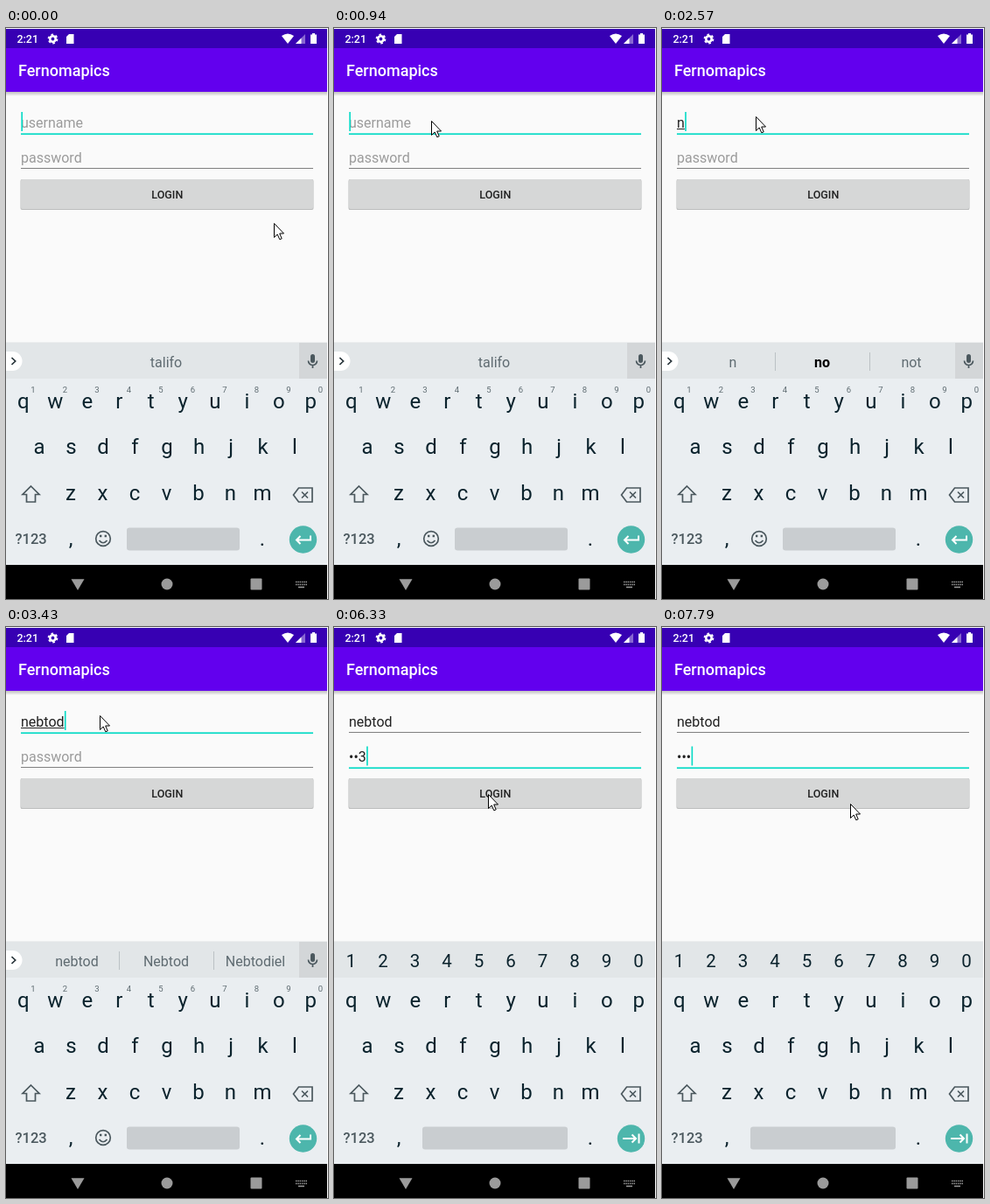
An HTML page for the animation above (8000 ms loop, 368 px wide and 653 px high).

```html
<!DOCTYPE html>
<html lang="en">
<head>
<meta charset="utf-8">
<title>Login screen</title>
<style>
html, body { margin: 0; width: 100%; height: 100%; overflow: hidden; background: #fff; }
svg { display: block; width: 368px; height: 653px; font-family: Roboto, sans-serif; }
.mid { text-anchor: middle; }
.key { font-size: 24px; fill: #0b232d; }
.num { font-size: 20.5px; fill: #0b232d; }
.sup { font-size: 9.5px; fill: #5d6a70; }
.sug { font-size: 16px; fill: #5f6b71; }
.hint { font-size: 16px; fill: #9b9b9b; }
.field { font-size: 16px; fill: #212121; }
.icon { fill: none; stroke: #4b585e; stroke-width: 1.7; }
</style>
</head>
<body>
<svg viewBox="0 0 368 653">
  <defs>
    <linearGradient id="shade" x2="0" y2="1">
      <stop stop-color="#000" stop-opacity=".24"/><stop offset="1" stop-color="#000" stop-opacity="0"/>
    </linearGradient>
    <clipPath id="buttonClip"><rect x="17" y="173" width="334" height="34" rx="2"/></clipPath>
  </defs>
  <rect width="367" height="653" fill="#fafafa"/>

  <!-- status and app bar -->
  <rect y="1" width="367" height="22" fill="#3700b3"/>
  <rect y="23" width="367" height="50" fill="#6200ee"/>
  <rect y="73" width="367" height="5" fill="url(#shade)"/>
  <g fill="#fff">
    <text x="12.400" y="17" font-size="12.500" font-weight="500">2:21</text>
    <circle cx="53.500" cy="12.500" r="3.200" fill="none" stroke="#fff" stroke-width="2.600"/>
    <circle cx="53.500" cy="12.500" r="5" fill="none" stroke="#fff" stroke-width="1.800" stroke-dasharray="2.6 2.636"/>
    <path d="M72 7H77.500V18H69V10Z"/>
    <path d="M315 9Q322 4 329 9L322 18Z"/>
    <path d="M342 7V18H331Z" opacity=".4"/>
    <path d="M337.500 11.500V18H331Z"/>
    <path d="M350 6H353V7.500H355V18H348V7.500H350Z"/>
    <text x="14" y="55" font-size="18" font-weight="500">Fernomapics</text>
  </g>

  <!-- form -->
  <text id="userHint" class="hint" x="17" y="114">username</text>
  <text id="passHint" class="hint" x="17" y="154">password</text>
  <text id="user" class="field" x="17" y="114"></text>
  <text id="pass" class="field" x="17" y="154"></text>
  <rect id="compose" x="17" y="115" height="1" fill="#212121"/>
  <rect id="userLine" x="17" width="334"/>
  <rect id="passLine" x="17" width="334"/>
  <rect id="caret" width="1.600" height="22" fill="#03dac5"/>
  <rect id="lift" x="17" y="175" width="334" height="35" rx="3" fill="#000"/>
  <rect x="16.500" y="173" width="335" height="35" rx="2" fill="#bcbdbd"/>
  <rect x="17" y="173" width="334" height="34" rx="2" fill="#d6d7d7"/>
  <circle id="ripple" cx="216" cy="203" clip-path="url(#buttonClip)"/>
  <text class="mid" x="184.300" y="195" font-size="12.500" font-weight="500" fill="#212121">LOGIN</text>

  <!-- keyboard -->
  <rect y="359" width="367" height="1" fill="#eceeef"/>
  <rect y="360" width="367" height="41" fill="#e2e6e8"/>
  <rect y="401" width="367" height="213" fill="#eaeef1"/>
  <g id="keys"></g>
  <g id="textMode">
    <rect x="335" y="360" width="32" height="41" fill="#d3d6d8"/>
    <path d="M0 370H7.500A11 11 0 0 1 7.500 392H0Z" fill="#fff"/>
    <path d="M6.500 377L10.700 381L6.500 385" class="icon" style="stroke:#263238"/>
    <rect x="348" y="373" width="5" height="10" rx="2.500" fill="#4b585e"/>
    <path d="M345.500 380.500A5 5 0 0 0 355.500 380.500M350.500 385.500V389" class="icon"/>
    <path id="dividers" d="M129.500 371V392M237.500 371V392" stroke="#bbc1c5"/>
    <text class="sug mid" x="81" y="387.500"></text>
    <text class="sug mid" x="183" y="387.500"></text>
    <text class="sug mid" x="285" y="387.500"></text>
    <g id="sups"></g>
    <circle cx="111" cy="584" r="8.300" class="icon"/>
    <path d="M106.500 586Q111 591.500 115.500 586" class="icon"/>
    <path d="M107 581h2.400m3.200 0h2.400" class="icon" style="stroke-width:2.400"/>
  </g>
  <g id="digits"></g>
  <path class="icon" d="M28.500 524L38 533.500H33.500V542H23.500V533.500H19Z"/>
  <path class="icon" d="M334.500 526H350V542H334.500L328.500 534ZM338 530.500L345 537.500M345 530.500L338 537.500"/>
  <text x="10.500" y="590" font-size="16.500" font-weight="500" fill="#4b585e">?123</text>
  <text class="key mid" x="74" y="592">,</text>
  <text class="key mid" x="293" y="592">.</text>
  <rect id="space" y="571.500" height="26" rx="3" fill="#c9cdd0"/>
  <circle cx="339.500" cy="585" r="15.700" fill="#4db6ac"/>
  <path id="enter" fill="none" stroke="#fff" stroke-width="2"/>

  <!-- navigation bar -->
  <rect y="614" width="367" height="39"/>
  <g fill="#9b9b9b">
    <path d="M74.500 630.300H89.500L82 643Z"/>
    <circle cx="184" cy="636" r="6.500"/>
    <rect x="279.500" y="629.500" width="13" height="13" rx="1"/>
    <path d="M331 633.500H344M331 636.500H344" stroke="#9b9b9b" stroke-width="1.500" stroke-dasharray="1.500 .8"/>
    <path d="M334 639.500H341" stroke="#9b9b9b" stroke-width="1.500"/>
  </g>

  <path id="mouse" d="M.5 .5V16.500L4.200 13L6.800 18.800L9.200 17.800L6.700 12H11.500Z" fill="#fff" stroke="#000"/>
</svg>
<script>
const LOOP = 8000;
const $ = id => document.getElementById(id);
const set = (el, attrs) => { for (const k in attrs) el.setAttribute(k, attrs[k]); };
const show = (id, on) => { $(id).style.display = on ? '' : 'none'; };

const row = (chars, x, y, cls) => [...chars].map((c, i) =>
  `<text class="${cls} mid" x="${x + 36.5 * i}" y="${y}">${c}</text>`).join('');
$('keys').innerHTML = row('qwertyuiop', 19.8, 435, 'key') + row('asdfghjkl', 38, 487, 'key') + row('zxcvbnm', 74, 540, 'key');
$('sups').innerHTML = row('1234567890', 31, 417, 'sup');
$('digits').innerHTML = row('1234567890', 19.5, 389, 'num');

const userText = [[0, ''], [2510, 'n'], [2690, 'ne'], [3030, 'neb'], [3130, 'nebt'], [3250, 'nebto'], [3430, 'nebtod']];
const passText = [[0, ''], [5610, '1'], [5760, '•2'], [5850, '••3'], [7290, '•••']];
// A star marks the bold suggestion.
const suggestions = [
  [0, ',talifo,'], [2540, 'n,*no,not'], [2720, 'ne,*new,net'], [3060, 'neb,Neb,Nebtod'],
  [3160, 'nebt,nebtod,Nebtod'], [3280, 'nebto,nebtod,Nebtod'], [3430, 'nebtod,Nebtod,Nebtodiel']
];
const caretStates = [
  [0, 1], [330, 0], [830, 1], [1330, 0], [1830, 1], [2330, 0], [2510, 1], [3900, 0], [4400, 1],
  [4740, 1], [5220, 0], [5610, 1], [6350, 0], [6850, 1], [7440, 0], [7790, 1]
];
const mousePath = [
  [0, 306, 223], [30, 306, 223], [220, 270, 237], [400, 222, 238], [620, 150, 192], [810, 111, 142],
  [940, 111, 106], [1000, 111, 106], [1520, 107, 101], [6190, 107, 101], [6390, 205, 228],
  [6530, 205, 228], [6860, 215, 204], [7230, 215, 204], [7260, 215, 202], [LOOP, 215, 202]
];

const latest = (list, t) => list.findLast(([start]) => start <= t)[1];

function mouseAt(t) {
  const i = mousePath.findIndex(p => p[0] > t);
  const [t0, x0, y0] = mousePath[i - 1], [t1, x1, y1] = mousePath[i];
  const k = (t - t0) / (t1 - t0);
  return [Math.round(x0 + (x1 - x0) * k), Math.round(y0 + (y1 - y0) * k)];
}

function underline(id, y, focused) {
  set($(id), focused ? { y: y + .4, height: 1.7, fill: '#03dac5' } : { y, height: 1, fill: '#808080' });
}

function draw(now) {
  const t = now % LOOP;
  const onPass = t >= 4740, digitsMode = t >= 4770;
  const user = latest(userText, t), pass = latest(passText, t);
  $('user').textContent = user;
  $('pass').textContent = pass;
  show('userHint', !user);
  show('passHint', !pass);
  underline('userLine', 120, !onPass);
  underline('passLine', 160, onPass);

  const userWidth = user ? $('user').getComputedTextLength() : 0;
  const passWidth = pass ? $('pass').getComputedTextLength() : 0;
  set($('compose'), { width: onPass ? 0 : userWidth });
  set($('caret'), { x: 17.4 + (onPass ? passWidth : userWidth), y: onPass ? 136.5 : 96, opacity: latest(caretStates, t) });

  show('textMode', !digitsMode);
  show('digits', digitsMode);
  const words = latest(suggestions, t).split(',');
  document.querySelectorAll('.sug').forEach((el, i) => {
    const bold = words[i][0] === '*';
    el.textContent = words[i].replace('*', '');
    el.style.fontWeight = bold ? 700 : 400;
    el.style.fill = bold ? '#000' : '';
  });
  show('dividers', words[0]);
  set($('space'), digitsMode ? { x: 101, width: 166 } : { x: 138, width: 129 });
  set($('enter'), { d: digitsMode
    ? 'M330 585H345M340.500 580.500L345 585L340.500 589.500M348.500 579.500V590.500'
    : 'M348 580.500V585.500H332M336.500 581L332 585.500L336.500 590' });

  const press = Math.min(1, Math.max(0, (t - 7410) / 380));
  const strength = Math.sin(Math.PI * press);
  set($('ripple'), { r: 220 * press, opacity: .1 * strength });
  set($('lift'), { opacity: .15 * strength });
  set($('mouse'), { transform: `translate(${mouseAt(t)})` });
  requestAnimationFrame(draw);
}
requestAnimationFrame(draw);
</script>
</body>
</html>
```
